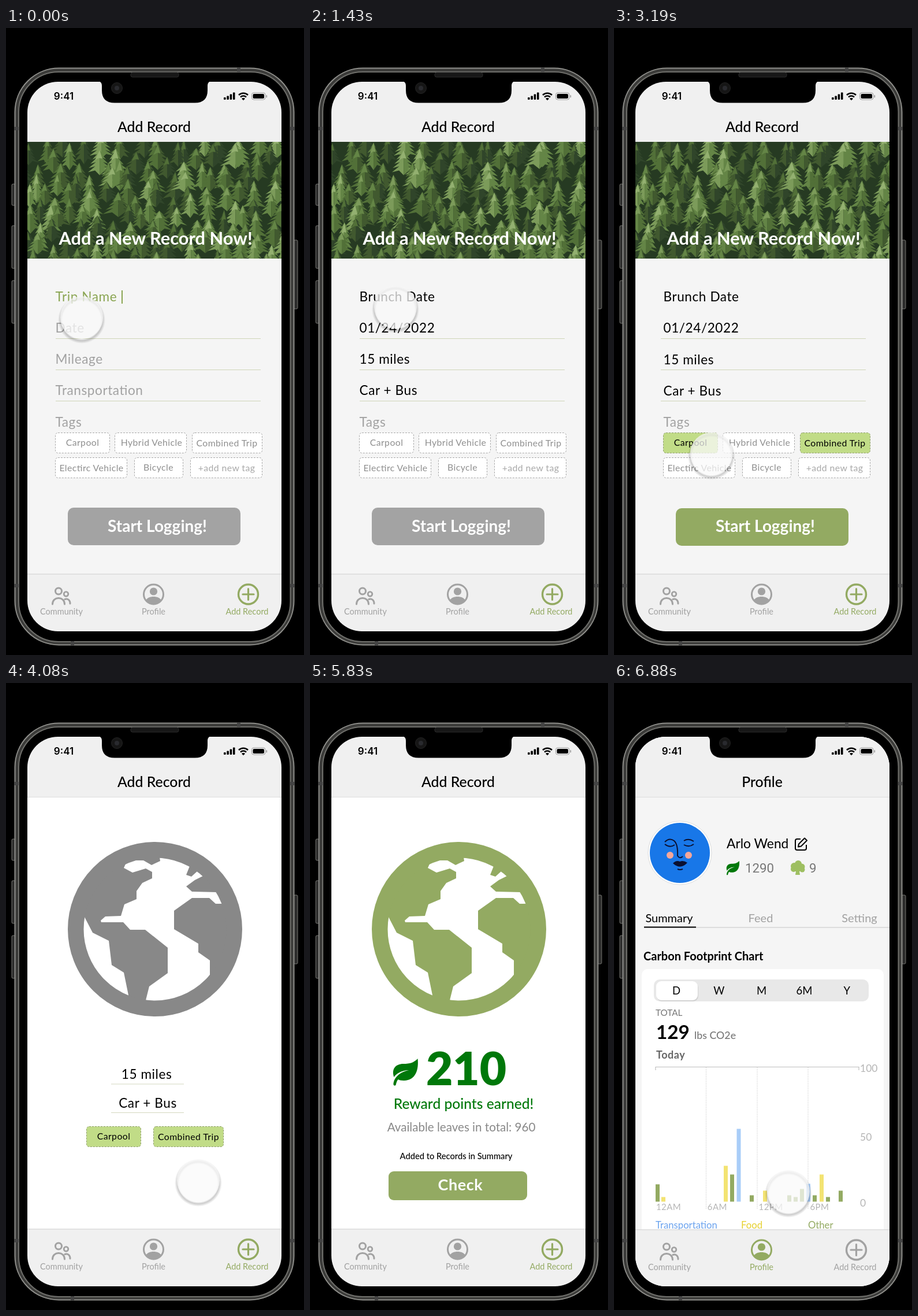
Animation of 516 by 1085 pixels, one loop 7.88 s. Source, as an HTML page:

```html
<!DOCTYPE html>
<html lang="en">
<head>
<meta charset="utf-8">
<title>Add Record</title>
<style>
  html, body { margin: 0; height: 100%; overflow: hidden; background: #000; }
  svg { display: block; width: 516px; height: 1085px; }
  text { font-family: Lato, Carlito, sans-serif; font-feature-settings: "liga" 1; }
  .m { text-anchor: middle; }
  .b { font-weight: 700; }
  .md { font-weight: 500; }
  .s { letter-spacing: .56px; }
  .t { letter-spacing: .42px; }
  .i { font-family: Inter, sans-serif; font-weight: 600; }
  .r { font-family: Roboto, sans-serif; }
</style>
</head>
<body>
<svg id="stage" viewBox="0 0 516 1085"></svg>
<script>
const GREEN = '#93aa62', GREY = '#a2a2a2', LOOP = 7880;

const rect = (x, y, w, h, fill, rx = 0, more = '') =>
  `<rect x="${x}" y="${y}" width="${w}" height="${h}" rx="${rx}" fill="${fill}" ${more}/>`;
const circle = (x, y, r, fill, more = '') =>
  `<circle cx="${x}" cy="${y}" r="${r}" fill="${fill}" ${more}/>`;
const path = (d, fill, more = '') => `<path d="${d}" fill="${fill}" ${more}/>`;
const stroke = (d, color, w = 1, more = '') =>
  path(d, 'none', `stroke="${color}" stroke-width="${w}" ${more}`);
const text = (x, y, size, str, fill = '#000', cls = '') =>
  `<text x="${x}" y="${y}" font-size="${size}" fill="${fill}" class="${cls}">${str}</text>`;
const group = (id, body) => `<g id="${id}">${body}</g>`;

// ---- shared chrome ----
const divider = stroke('M37 197.5H477', '#dcdcdc');
const header = title => rect(37, 93, 440, 104, '#f0f0f0') + divider +
  text(256.5, 180, 24.8, title, '#000', 'm md');

function nav(active) {
  const c = n => n === active ? GREEN : GREY;
  const line = 'stroke-linecap="round"';
  return rect(37, 945, 440, 99, '#f0f0f0') + stroke('M37 945H477', '#cfcfcf') +
    circle(91, 974.5, 5.5, 'none', `stroke="${c(0)}" stroke-width="3"`) +
    circle(104, 979.5, 3.8, 'none', `stroke="${c(0)}" stroke-width="2.8"`) +
    stroke('M80.5 997C80.5 983 101.5 983 101.5 997M102 988.5C107 987 111 990 111 996', c(0), 3, line) +
    text(96, 1015, 14.5, 'Community', c(0), 'm') +
    circle(255.5, 980, 17, 'none', `stroke="${c(1)}" stroke-width="3"`) +
    circle(255.5, 975, 6.6, c(1)) +
    path('M242.5 990C246 982 265 982 268.5 990A16.5 16.5 0 0 1 242.5 990z', c(1)) +
    text(255.5, 1015, 14.5, 'Profile', c(1), 'm') +
    circle(419.5, 980, 17, 'none', `stroke="${c(2)}" stroke-width="3.4"`) +
    stroke('M410 980h19M419.5 970.5v19', c(2), 3.2, line) +
    text(417.5, 1015, 14.5, 'Add Record', c(2), 'm');
}

// A stand of firs seen from above: jagged cones with a dark and a lit side.
function forest() {
  let seed = 7;
  const rnd = () => (seed = seed * 16807 % 2147483647) / 2147483647;
  const tones = ['#30452a', '#41592f', '#527038', '#648546', '#7c9b5a', '#93b070'];
  let out = rect(37, 197, 440, 203, '#263a22');
  for (let row = 0; row < 11; row++) {
    for (let col = 0; col < 14; col++) {
      const x = 33 + col * 34 + (row % 2) * 17 + rnd() * 24 - 12;
      const y = 176 + row * 21 + rnd() * 18, w = 15 + rnd() * 10, h = 36 + rnd() * 18;
      const tone = Math.floor(rnd() * 4);
      for (const side of [-1, 1]) {
        let d = `M${x} ${y}`;
        for (let k = 1; k <= 5; k++) {
          const reach = side * w * (k / 5) ** .7 * (.75 + rnd() * .4), py = y + h * k / 6;
          d += `L${x + reach} ${py + 2}L${x + reach * .4} ${py - 1}`;
        }
        out += path(`${d}L${x} ${y + h}z`, tones[side < 0 ? tone + 1 : tone]);
      }
      out += path(`M${x} ${y}l${-w * .35} ${h * .4}l${w * .3} ${-h * .08}l${w * .25} ${h * .02}z`, tones[tone + 2]);
    }
  }
  return `<g clip-path="url(#photo)">${out}</g>` +
    text(259, 375, 30.8, 'Add a New Record Now!', '#fff', 'm b');
}

// ---- form ----
const tag = (x, y, w, mid, base, str, on, color = '#8f8f8f') =>
  rect(x + .5, y + .5, w, 35, on ? '#c1dc87' : '#fff', 4.5,
    `stroke="${on ? '#8f9f6c' : '#a8a8a8'}" stroke-dasharray="3 2"`) +
  text(mid, base, 15.8, str, on ? '#000' : color, 'm t');

function form(values, ready) {
  const d = ready ? 1 : 0, x0 = ready ? 81 : 86;
  const labels = values ? ['Brunch Date', '01/24/2022', '15 miles', 'Car + Bus']
    : ['Trip Name', 'Date', 'Mileage', 'Transportation'];
  let out = rect(37, 399, 440, 546, '#f5f5f5');
  labels.forEach((s, i) => {
    const fill = values ? '#000' : i ? GREY : '#8aa552';
    out += text(85.5, 473 + i * 54 + (i > 1 ? d : 0), 22.6, s, fill, 's');
    if (i) out += stroke(`M${x0} ${483.5 + i * 54}h355`, '#cfd5b8', 1.2);
  });
  if (!values) out += stroke('M201 454V477', '#8aa552', 2);
  return out + text(85.5, 690, 22.6, 'Tags', GREY, 's') +
    tag(85, 700, 94, 132.5, 723, 'Carpool', ready) +
    tag(188, 700, 124, 252, 723, 'Hybrid Vehicle') +
    tag(322, 700, 121, 382.5, 724, 'Combined Trip', ready) +
    tag(85, 743, 124, 148, 767, 'Electirc Vehicle') +
    tag(222, 743, 84, 264, 766, 'Bicycle') +
    tag(319, 743, 124, 382, 767, '+add new tag', false, '#a8a8a8') +
    rect(107, 830 + d, 299, 65, ready ? GREEN : '#a3a3a3', 10) +
    text(262, 872, 28, 'Start Logging!', '#fff', 'm b');
}

// ---- globe and reward ----
const LAND = 'M120 385L136 405 150 432 178 446 183 488 204 501 213 545 215 560 238 560 242 549 248 525' +
  ' 280 502 280 458 241 427 215 427 203 414 165 414 164 411 172 404 199 403 205 383 226 374 226 360' +
  ' 236 346 253 338 253 327 242 321 219 328 204 320 208 311 217 307 238 307 252 315 267 308 265 295 200 280 120 330z' +
  'M316 308L318 317 312 332 321 335 331 326 338 318zM350 328L341 334 327 341 312 352 322 361 365 362 390 360z' +
  'M390 382L363 382 352 372 322 372 291 394 291 426 333 451 333 466 353 480 353 540 400 500z';
const land = fill => path(LAND, fill, 'clip-path="url(#sea)"');
const globe = fill => rect(37, 197, 440, 748, '#fff') + divider + land(fill) +
  circle(258, 426, 137.25, 'none', `stroke="${fill}" stroke-width="27.5"`);

const leaf = (x, y, k) => path(
  'M43 0C45 18 40 38 19 38 14 38 11 37 9 36 6 40 6 43 5 46Q2 48 1 45C1 36 8 24 28 20 14 20 5 27 2 32-3 18 5 9 18 9 30 9 36 7 43 0z',
  '#00780a', `transform="translate(${x} ${y}) scale(${k})"`);

const trip = globe('#888') + group('land', land(GREEN)) +
  text(243.5, 685, 22.6, '15 miles', '#000', 'm s') + stroke('M182 694h126', '#d3d7bf', 1.2) +
  text(245.5, 735, 22.6, 'Car + Bus', '#000', 'm s') + stroke('M182 743.5h126', '#d3d7bf', 1.2) +
  tag(139, 767, 94, 186.5, 790, 'Carpool', true) +
  tag(255, 767, 121, 316, 791, 'Combined Trip', true);

const reward = globe(GREEN) + leaf(143.5, 650, 1) +
  `<g font-weight="900">${text(270.5, 696, 80, '210', '#00780a', 'm')}</g>` +
  text(266, 737, 24.6, 'Reward points earned!', '#00780a', 'm md') +
  text(262, 776, 20.6, 'Available leaves in total: 960', '#888', 'm') +
  text(253, 824, 14.7, 'Added to Records in Summary', '#000', 'm md') +
  rect(136, 845, 240, 50, GREEN, 9) + text(260.5, 878, 27, 'Check', '#fff', 'm b s');

// ---- profile ----
const INK = '#0b1030';
const avatar = circle(114, 294, 55, '#fff', 'stroke="#dcdcdc"') + circle(114, 294, 52, '#1877e8') +
  circle(97, 298, 6, '#f5a79a') + circle(129, 298, 6, '#f5a79a') +
  stroke('M88 275Q96 267 104 273Q111 279 110 299Q114 305 119 300M121 273Q129 268 138 274' +
    'M88 279Q97 286 105 280M121 280Q130 285 138 279M110 322Q114 324 119 322', INK, 2) +
  path('M102 312Q108 306 114 309 120 306 127 311 115 324 102 312z', INK);

function chart() {
  const G = GREEN, Y = '#f3e372', B = '#a9cdf8', soft = '#b5b5b5';
  const bars = [[72, 30, G], [82, 8, Y], [190, 62, Y], [201, 47, G], [212.5, 126, B], [235, 11, G],
    [258, 19, Y], [300, 11, G], [311, 8, G], [322, 22, G], [333, 31, B], [344, 11, G], [356, 47, Y],
    [367, 8, G], [389, 19, G]];
  let out = stroke('M72 670V664.5H424V670', '#bdbdbd', 1.2) +
    stroke('M159.5 665V910M248 665V910M336 665V910', '#cfcfcf', 1, 'stroke-dasharray="1.5 1.5"');
  bars.forEach(([x, h, c]) => out += rect(x, 897.5 - h, 7, h, c));
  ['12AM', '6AM', '12PM', '6PM'].forEach((s, i) => out += text(73 + i * 88.8, 912, 15, s, soft, 't'));
  [['100', 673], ['50', 792], ['0', 906]].forEach(([s, y]) => out += text(426, y, 17.5, s, soft));
  return out + text(72, 943.5, 16.7, 'Transportation', '#6ba3ee') +
    text(220, 943.5, 16.7, 'Food', '#e6d02f') + text(336, 943.5, 16.7, 'Other', GREEN);
}

const tree = [[312, 317, 6], [319, 313, 6], [325, 318, 5.5], [311, 322, 5], [326, 323, 4.5], [318, 321, 6]]
  .map(([x, y, r]) => circle(x, y, r, '#9ebf61')).join('') + path('M316 320h4l2 12h-8z', '#9ebf61');

const profile = rect(37, 93, 440, 951, '#f5f5f5') + header('Profile') + avatar +
  text(195, 286, 22.8, 'Arlo Wend') +
  stroke('M323 270h-6q-3 0-3 3v13q0 3 3 3h13q3 0 3-3v-6M330 268.5l4 4-10 10-5 1 1-5z', '#000', 2, 'stroke-linejoin="round"') +
  leaf(194.5, 308, .52) + text(227, 328, 22.3, '1290', '#777', 'r') +
  tree + text(338, 328, 22.3, '9', '#777', 'r') +
  text(95.5, 414, 20, 'Summary', '#000', 'm') + text(254, 414, 20, 'Feed', GREY, 'm') +
  text(425, 414, 20, 'Setting', GREY, 'm') +
  stroke('M52 423H477', '#c4c4c4') + stroke('M52 422.5h90', '#000', 2.2) +
  text(51, 480, 20, 'Carbon Footprint Chart', '#000', 'b') +
  rect(48, 495, 419, 470, '#fff', 10) + rect(69, 513, 372, 38, '#e8e8e8', 10) +
  rect(74, 518, 72, 33, '#d2d2d2', 9) + rect(73, 516, 72, 33, '#fff', 9) +
  ['D', 'W', 'M', '6M', 'Y'].map((s, i) => text(108 + i * 73.8, 539, 18.5, s, '#000', 'm')).join('') +
  text(72, 576, 15.3, 'TOTAL', '#777') + text(73, 616, 33.3, '129', '#000', 'b') +
  text(139, 616, 17.8, 'lbs CO2e', '#777', 'md') + text(73, 650, 18, 'Today', '#666', 'b s') +
  chart() + `<g transform="translate(0 1)">${nav(1)}</g>`;

// ---- phone ----
const metal = (x, y, w, h) => rect(x, y, w, h, '#2c2c2b', 2, 'stroke="#777772"');
const phone = metal(10, 270, 6, 37) + metal(10, 342, 6, 74) + metal(10, 437, 6, 74) + metal(498, 367, 7, 119) +
  rect(15.5, 69.5, 483, 998, '#3b3b39', 76, 'stroke="#8f8f8b" stroke-width="2"') +
  rect(22, 76, 470.5, 986, '#000', 69, 'stroke="#6f6f6b" stroke-width="2"') +
  rect(400, 69, 6, 7, '#444') + rect(112, 1061, 6, 7, '#444') +
  rect(15, 171, 7, 6, '#444') + rect(492, 171, 7, 6, '#444') +
  rect(15, 962, 7, 6, '#444') + rect(492, 962, 7, 6, '#444') +
  rect(216, 77, 83, 8, '#171717', 3, 'stroke="#2b2b2b"');

const status = path('M160 92Q166 93 166 100V108Q166 129.5 188 129.5H327Q349 129.5 349 108V100Q349 93 355 92z', '#000') +
  circle(192, 104, 9.5, '#161616', 'stroke="#222"') + circle(192, 104, 4, '#292a2e') +
  text(100, 124, 17, '9:41', '#000', 'm i') +
  [4, 6.5, 9.5, 12.5].map((h, i) => rect(377 + i * 5.3, 124 - h, 3.6, h, '#000', 1)).join('') +
  stroke('M403 116a11.5 11.5 0 0 1 16 0M406 119.6a7 7 0 0 1 10 0', '#000', 2.6) +
  path('M408 122.3l3 3 3-3a4 4 0 0 0-6 0z', '#000') +
  rect(425.5, 112, 23.5, 12, 'none', 3.5, 'stroke="#9a9a9a"') +
  rect(427.5, 114, 19.5, 8, '#000', 2) + rect(450.5, 116, 1.6, 4.5, '#9a9a9a', 1);

// Pale disc over a soft shadow that shows only below its rim.
const touch = circle(0, 4, 41, 'url(#shade)') + circle(0, 0, 37, '#fafafa', 'fill-opacity=".74"');

document.getElementById('stage').innerHTML =
  `<defs><clipPath id="screen">${rect(37, 93, 440, 951, '#fff', 53)}</clipPath>
  <clipPath id="photo">${rect(37, 197, 440, 202, '#fff')}</clipPath>
  <clipPath id="sea">${circle(258, 426, 125, '#fff')}</clipPath>
  <radialGradient id="shade"><stop offset=".8" stop-opacity="0"/><stop offset=".88" stop-opacity=".2"/>
  <stop offset="1" stop-opacity="0"/></radialGradient></defs>` + phone +
  `<g clip-path="url(#screen)">` + header('Add Record') + forest() + form(false, false) +
  group('filled', form(true, false)) + group('ready', form(true, true)) +
  group('trip', trip) + group('reward', reward) + nav(2) + group('profile', profile) +
  status + `</g>` + group('touch', touch);

// ---- motion ----
const FADES = { filled: [500, 890], ready: [2240, 2580], trip: [4079, 4080], land: [4120, 4920],
  reward: [5050, 5340], profile: [6590, 6860] };
const PATH = [[0, 131, 501], [80, 131, 501], [320, 144, 494], [1380, 144, 494], [1430, 148, 483],
  [2060, 152, 724], [3085, 152, 724], [3650, 333, 861], [6000, 333, 861], [6001, 309, 893],
  [6120, 309, 893], [6320, 302, 880], [LOOP, 302, 880]];
const $ = id => document.getElementById(id);
const clamp = v => Math.min(1, Math.max(0, v));
const ease = u => u * u * (3 - 2 * u);

function draw(now) {
  const t = now % LOOP;
  for (const id in FADES) {
    const [a, b] = FADES[id];
    $(id).setAttribute('opacity', ease(clamp((t - a) / (b - a))));
  }
  const i = PATH.findIndex(p => p[0] > t), [t0, x0, y0] = PATH[i - 1], [t1, x1, y1] = PATH[i];
  const u = ease((t - t0) / (t1 - t0));
  $('touch').setAttribute('transform', `translate(${x0 + (x1 - x0) * u} ${y0 + (y1 - y0) * u})`);
  $('touch').setAttribute('opacity', t >= 5830 && t < 6170 ? 0 : 1);
  requestAnimationFrame(draw);
}
draw(0);
</script>
</body>
</html>
```
